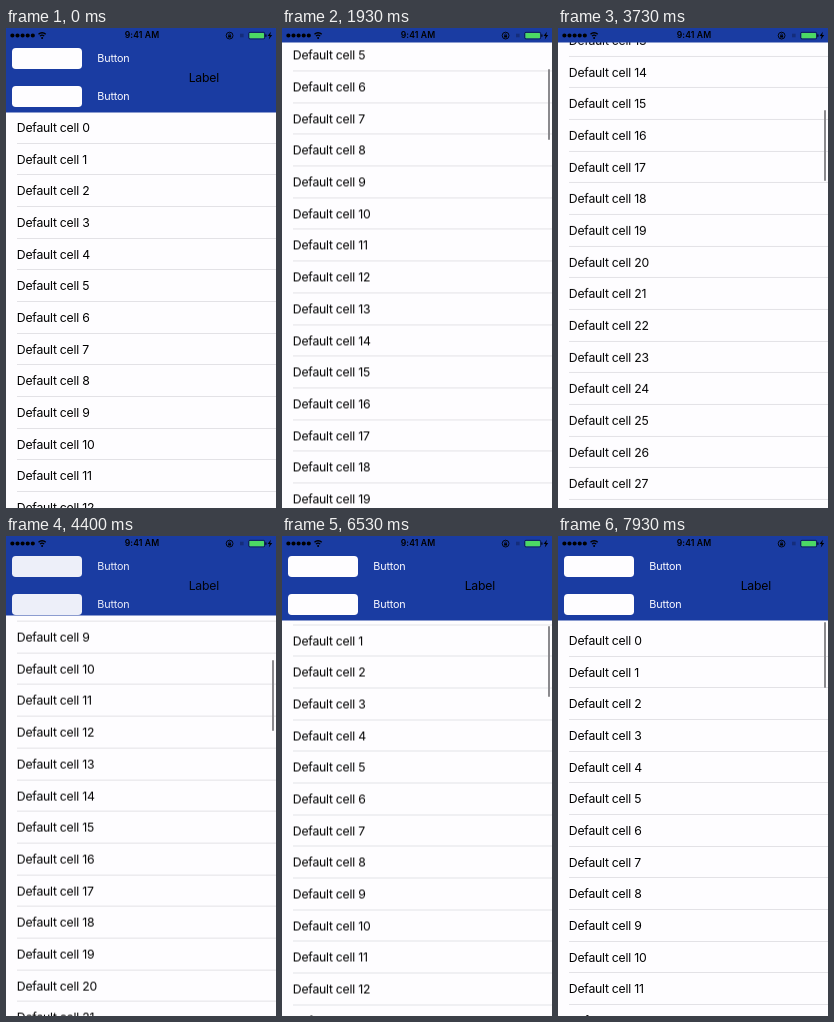
An HTML page for the animation above (8000 ms loop, 270 px wide and 480 px high).

```html
<!DOCTYPE html>
<html lang="en">
<head>
<meta charset="utf-8">
<title>Collapsing header</title>
<style>
  html, body { margin: 0; width: 100%; height: 100%; overflow: hidden; }
  body { position: relative; background: #fefdff; font: 12.24px Inter, Roboto, sans-serif; letter-spacing: -.24px; color: #000; }
  div, span, svg { position: absolute; white-space: nowrap; }
  #stage { left: 0; top: 0; width: 270px; height: 480px; overflow: hidden; }
  #list { left: 0; top: 84.4px; width: 270px; will-change: transform; }
  .row { left: 10.8px; right: 0; height: 31.68px; line-height: 31.68px; }
  .row::after { content: ""; position: absolute; left: 0; right: 0; bottom: 0; height: 1px; background: #e3e2e6; }
  #thumb { left: 265.8px; width: 1.9px; border-radius: 1px; background: #8b8a8e; }
  #bar { left: 0; top: 0; width: 270px; height: 90px; background: #1a3ca2; }
  #items { left: 0; top: 0; }
  .field { left: 6px; width: 69.5px; height: 21.4px; border-radius: 3.8px; background: #fefdff; }
  .button { left: 91.3px; line-height: 20px; font-size: 10.8px; letter-spacing: -.17px; color: #f8f8ff; }
  .label { left: 182.7px; top: 40px; line-height: 20px; }
  .time { left: 0; width: 272px; top: 0; line-height: 15px; text-align: center; font-size: 8.64px; font-weight: 600; letter-spacing: .12px; }
  svg { left: 0; top: 0; }
</style>
</head>
<body>
<div id="stage">
  <div id="list"></div>
  <div id="thumb"></div>
  <div id="bar">
    <div id="items">
      <div class="field" style="top:20px"></div>
      <div class="field" style="top:57.6px"></div>
      <span class="button" style="top:21.2px">Button</span>
      <span class="button" style="top:58.8px">Button</span>
      <span class="label">Label</span>
    </div>
  </div>
  <svg width="270" height="15" fill="none" stroke="#000">
    <path d="M6.4 7.5h21" stroke-width="4.2" stroke-linecap="round" stroke-dasharray="0 5.1"/>
    <path d="M32.5 6.3a5 5 0 0 1 7.2 0M34 8.1a3 3 0 0 1 4.2 0" stroke-width="1.3"/>
    <circle cx="36.1" cy="10" r="1" fill="#000" stroke="none"/>
    <circle cx="223.6" cy="7.6" r="3.4" stroke-width=".9"/>
    <path d="M222.1 7.3h3v2.2h-3z" fill="#000" stroke="none"/>
    <path d="M222.8 7.3v-.8a.8.8 0 0 1 1.6 0v.8" stroke-width=".6"/>
    <rect x="234" y="5.7" width="3.6" height="3.6" fill="#142d7b" stroke="none"/>
    <rect x="242.7" y="4.3" width="16" height="6.6" rx="1.2" stroke-width=".5"/>
    <rect x="243.4" y="5" width="14.6" height="5.2" rx=".6" fill="#4cd964" stroke="none"/>
    <path d="M259.9 6.4v2.4" stroke-width="1"/>
    <path d="M264.9 3.8l-3.3 4.3h2l-.8 3.4 3.4-4.5h-2z" fill="#000" stroke="none"/>
  </svg>
  <span class="time">9:41 AM</span>
</div>
<script>
const LOOP = 8000, STEP = 200 / 3, ROW = 31.68;
const BAR = 90, OPEN = 84.4, CLOSED = 14.4;
const REOPEN_AT = 348.5, RELEASE = 7250, PULL = -59;

// Scroll position keys: [ms, px]
const keys = [
  [1000, 0], [1330, 60], [1933, 230.5], [2733, 490.4], [3400, 540],
  [4130, 395], [4400, 283.4], [4800, 181], [5330, 142],
  [5870, 142], [6500, 32], [7130, PULL]
];

const $ = id => document.getElementById(id);
const clamp = (v, lo, hi) => Math.min(hi, Math.max(lo, v));
const list = $('list'), thumb = $('thumb'), bar = $('bar'), items = $('items');

for (let i = 0; i < 36; i++) {
  const row = document.createElement('div');
  row.className = 'row';
  row.style.top = i * ROW + 'px';
  row.textContent = 'Default cell ' + i;
  list.append(row);
}

const slope = i => (keys[i + 1][1] - keys[i][1]) / (keys[i + 1][0] - keys[i][0]);

// Harmonic mean keeps the curve monotone between keys
function tangent(i) {
  if (i === 0 || i === keys.length - 1) return 0;
  const a = slope(i - 1), b = slope(i);
  return a * b > 0 ? 2 * a * b / (a + b) : 0;
}

function scrollAt(t) {
  if (t <= keys[0][0]) return 0;
  if (t > RELEASE) {
    const x = 6 * (t - RELEASE) / 1000;
    return PULL * (1 + x) * Math.exp(-x);
  }
  const i = keys.findIndex((k, n) => n < keys.length - 1 && t < keys[n + 1][0]);
  if (i < 0) return PULL;
  const [t0, s0] = keys[i], [t1, s1] = keys[i + 1];
  const d = t1 - t0, u = (t - t0) / d, v = 1 - u;
  return v * v * (1 + 2 * u) * s0 + u * u * (3 - 2 * u) * s1
    + d * u * v * (v * tangent(i) - u * tangent(i + 1));
}

function heightAt(t, s) {
  const h = t < 2800 ? OPEN - s : CLOSED + REOPEN_AT - s;
  return clamp(h, CLOSED, OPEN);
}

function thumbAlpha(t) {
  if (t < 995 || (t > 5590 && t < 5860)) return 0;
  return t < 5590 ? clamp((5590 - t) / 250, 0, 1) : 1;
}

function draw(t) {
  const s = scrollAt(t), h = heightAt(t, s);
  list.style.transform = `translateY(${-s}px)`;
  bar.style.clipPath = `inset(0 0 ${BAR - h}px 0)`;
  items.style.opacity = (h - CLOSED) / (OPEN - CLOSED);
  const offset = Math.max(0, s - OPEN + h);
  thumb.style.top = h + 1.8 + offset * .153 + 'px';
  thumb.style.height = 71.2 + Math.min(0, s) + 'px';
  thumb.style.opacity = thumbAlpha(t);
}

const start = performance.now();
function tick() {
  const t = (performance.now() - start) % LOOP;
  draw(Math.min(119, Math.floor((t + 5) / STEP)) * STEP);
  requestAnimationFrame(tick);
}
tick();
</script>
</body>
</html>
```
